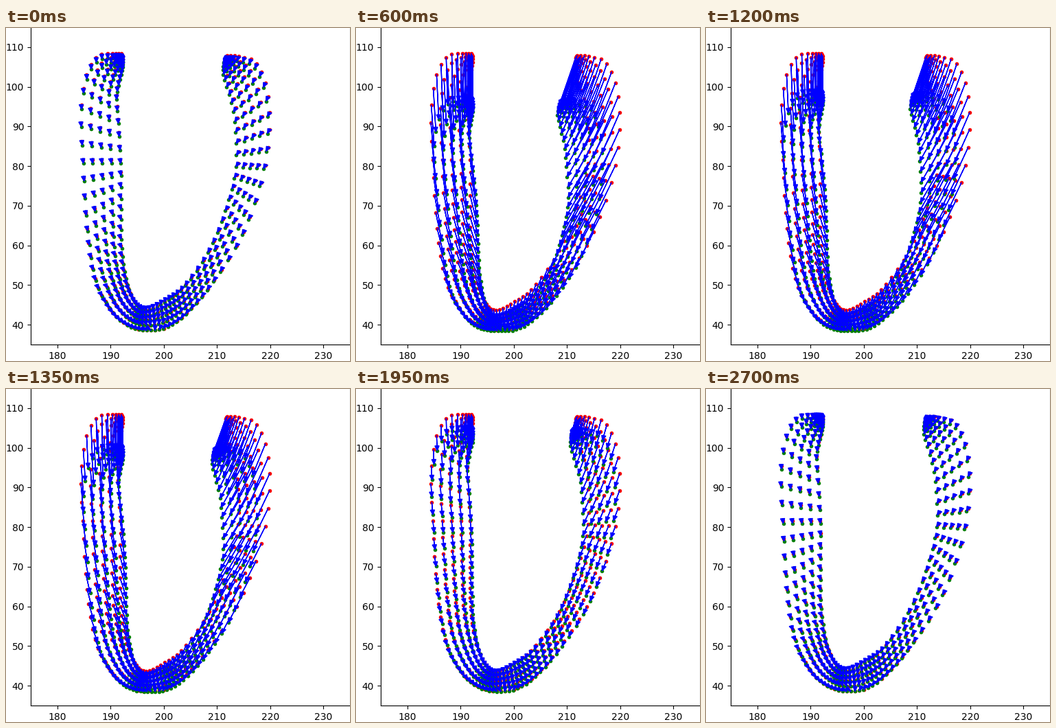
Write a matplotlib script that moves like this. It is 501 px wide and 485 px high and loops after 2850 ms.

```python
import numpy as np
import matplotlib.pyplot as plt
from matplotlib.animation import FuncAnimation
from matplotlib.collections import PolyCollection

WIDTH, HEIGHT, DPI = 501, 485, 100
FRAMES, INTERVAL = 19, 150
ROWS, LAYERS = 71, 5
HEAD_WIDTH, HEAD_LENGTH, SHAFT = 0.8, 1.2, 0.001
LIFT = 13.85            # largest downward travel of the rim, in data units


def smooth(x, knots, values):
    """Cubic Hermite curve through a few knots."""
    x, knots, values = (np.asarray(a, float) for a in (x, knots, values))
    slopes = np.gradient(values, knots)
    i = np.clip(np.searchsorted(knots, x, side="right") - 1, 0, len(knots) - 2)
    h = knots[i + 1] - knots[i]
    t = (x - knots[i]) / h
    return ((1 + 2 * t) * (1 - t) ** 2 * values[i]
            + t * (1 - t) ** 2 * h * slopes[i]
            + t * t * (3 - 2 * t) * values[i + 1]
            + t * t * (t - 1) * h * slopes[i + 1])


# Walls of the cup, from the left rim over the apex to the right rim
wall_rows = [0, 3, 6, 8, 10, 13, 17, 21, 25, 30, 35,
             40, 45, 49, 53, 57, 60, 62, 64, 67, 70]
outer_wall = [
    (192.0, 108.4), (190.4, 108.4), (187.3, 107.4), (185.5, 103.1),
    (184.5, 95.4), (184.8, 81.6), (185.6, 64.3), (187.1, 51.6),
    (189.7, 44.4), (193.1, 40.0), (196.8, 38.6), (200.8, 39.5),
    (205.2, 44.2), (209.5, 51.3), (215.0, 63.4), (219.1, 80.2),
    (219.9, 93.5), (219.1, 101.0), (217.5, 105.8), (214.1, 107.7),
    (211.9, 107.9)]
inner_wall = [
    (192.3, 107.7), (192.2, 105.3), (191.5, 101.5), (191.1, 97.9),
    (191.4, 91.8), (191.8, 81.6), (191.8, 69.8), (191.9, 59.9),
    (192.7, 52.1), (194.5, 45.9), (196.7, 43.7), (200.2, 45.9),
    (204.2, 50.2), (208.5, 58.7), (211.9, 69.5), (214.0, 80.7),
    (214.0, 89.5), (213.6, 94.7), (212.7, 99.1), (211.6, 104.3),
    (211.6, 107.2)]


def wall(points):
    rows = np.arange(ROWS)
    return np.column_stack([smooth(rows, wall_rows, c) for c in zip(*points)])


depth = np.linspace(0, 1, LAYERS)[None, :, None]
mesh = wall(outer_wall)[:, None] * (1 - depth) + wall(inner_wall)[:, None] * depth

# Full displacement: inward pull along x, drop along y fading out at the apex
pull = smooth(np.arange(ROWS),
              [0, 10, 18, 24, 30, 35, 43, 49, 54, 60, 65, 70],
              [-0.1, 0.8, 1.8, 1.8, 1.0, 0.3, -1.0, -2.1, -3.7, -4.9, -4.3, -3.6])
full_dx = pull[:, None] * (0.85 + 0.2 * depth[..., 0])
full_dy = -LIFT * np.clip((mesh[..., 1] - 38.5) / 69.9, 0, 1) ** 0.65
full_shift = np.stack([full_dx, full_dy], axis=-1).reshape(-1, 2)
rest = mesh.reshape(-1, 2)

# Contraction over the beat, for each axis
beat = [0, 2, 6, 8, 11, 13, 18]
beat_x = [0.10, 0.40, 1.0, 0.68, 0.50, 0.22, 0.07]
beat_y = [0.09, 0.50, 1.0, 0.74, 0.42, 0.29, 0.065]


def shift_at(frame):
    return full_shift * [smooth(frame, beat, beat_x), smooth(frame, beat, beat_y)]


def arrow_polygons(start, shift):
    """Arrows whose tips end exactly at start + shift."""
    length = np.maximum(np.hypot(*shift.T), 1e-6)
    along = shift / length[:, None]
    across = np.column_stack([-along[:, 1], along[:, 0]])
    tip = start + shift

    def vertex(back, side):
        return tip - along * np.reshape(back, (-1, 1)) + across * side

    return np.stack([
        vertex(0, 0),
        vertex(HEAD_LENGTH, -HEAD_WIDTH / 2), vertex(HEAD_LENGTH, -SHAFT / 2),
        vertex(length, -SHAFT / 2), vertex(length, SHAFT / 2),
        vertex(HEAD_LENGTH, SHAFT / 2), vertex(HEAD_LENGTH, HEAD_WIDTH / 2),
    ], axis=1)


# The epsilon keeps the pixel size from being truncated
fig = plt.figure(figsize=((WIDTH + 1e-4) / DPI, (HEIGHT + 1e-4) / DPI), dpi=DPI)
ax = fig.add_axes([36 / WIDTH, 24 / HEIGHT, 465 / WIDTH, 462 / HEIGHT])
ax.set(xlim=(175, 235), ylim=(35, 115))

ax.scatter(*rest.T, s=16, c="red", linewidths=0, zorder=1)
moved = ax.scatter(*rest.T, s=16, c="green", linewidths=0, zorder=1.1)
arrows = PolyCollection(arrow_polygons(rest, shift_at(0)), facecolor="blue",
                        edgecolor="blue", linewidth=1, joinstyle="miter", zorder=1.2)
ax.add_collection(arrows, autolim=False)


def update(frame):
    shift = shift_at(frame)
    moved.set_offsets(rest + shift)
    arrows.set_verts(arrow_polygons(rest, shift))
    return moved, arrows


anim = FuncAnimation(fig, update, frames=FRAMES, interval=INTERVAL,
                     repeat=True, repeat_delay=0)
plt.show()
```
